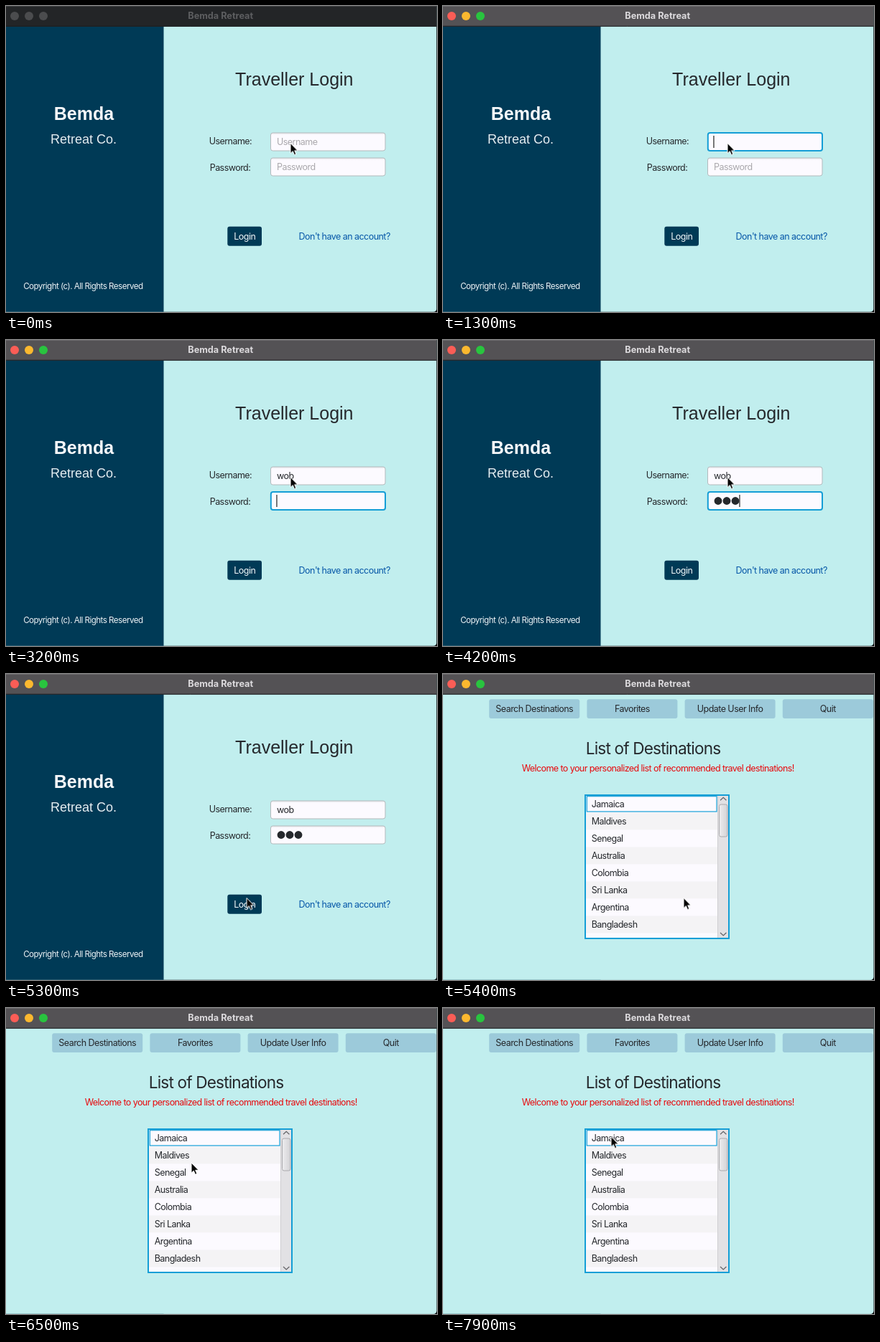
Animation of 600x427 px, one loop 8 s. Source, as an HTML page:

```html
<!DOCTYPE html>
<html lang="en">
<head>
<meta charset="utf-8">
<title>Traveller Login</title>
<style>
html, body { margin: 0; width: 100%; height: 100%; overflow: hidden; background: #0c0d0f; }
svg { display: block; width: 100vw; height: 100vh; }
text { font: 12.5px Inter, Roboto, sans-serif; letter-spacing: -.54px; fill: #25282c; }
.mid { text-anchor: middle; }
.title { font-weight: 700; font-size: 12.7px; letter-spacing: 0; fill: #dcdadd; }
.dim { fill: #5d5e60; }
.arial { font-family: "Liberation Sans", Arial, sans-serif; font-size: 25px; letter-spacing: 0; }
.brand { font-weight: 700; fill: #f6f8fa; }
.sub { font-size: 18px; fill: #e6edf1; }
.legal { font-size: 11.6px; letter-spacing: -.53px; fill: #eef3f6; }
.head { font-size: 22.6px; letter-spacing: -.83px; }
.welcome { letter-spacing: -.58px; fill: #e8090d; }
.hint { fill: #aaa8ac; }
.link { fill: #0657a8; }
.light { fill: #f4f7f9; }
.field { fill: url(#fieldFill); stroke: #b3b9bc; }
.ring { fill: #fcfaff; stroke: #149ed6; stroke-width: 2; }
.caret { fill: #333; }

/* Every timeline is one 8 s loop */
.idle, .hint, .ring, .carets, .key, .list, .cursor, .walk { animation: 8s step-end infinite; }
.idle, .hintUser { animation-name: untilClick; }
.hintPass { animation-name: untilTab; }
.onUser { animation-name: userFocus; }
.onPass { animation-name: passFocus; }
.walkUser { animation-name: walkUser; }
.walkPass { animation-name: walkPass; }
.list { animation-name: listIn; }
.cursor { animation-name: move; animation-timing-function: ease-in-out; }
.caret { animation: blink 1s step-end infinite; }
.u1 { animation-name: u1; } .u2 { animation-name: u2; } .u3 { animation-name: u3; }
.p1 { animation-name: p1; } .p2 { animation-name: p2; } .p3 { animation-name: p3; }

@keyframes untilClick { 0% { opacity: 1; } 7.5%, 100% { opacity: 0; } }
@keyframes untilTab { 0% { opacity: 1; } 37.5%, 100% { opacity: 0; } }
@keyframes userFocus { 0% { opacity: 0; } 7.5% { opacity: 1; } 37.5%, 100% { opacity: 0; } }
@keyframes passFocus { 0% { opacity: 0; } 37.5% { opacity: 1; } 65%, 100% { opacity: 0; } }
@keyframes listIn { 0% { opacity: 0; } 67.5%, 100% { opacity: 1; } }
@keyframes blink { 0% { opacity: 0; } 20% { opacity: 1; } 70%, 100% { opacity: 0; } }
@keyframes u1 { 0% { fill-opacity: 0; } 25%, 100% { fill-opacity: 1; } }
@keyframes u2 { 0% { fill-opacity: 0; } 28.75%, 100% { fill-opacity: 1; } }
@keyframes u3 { 0% { fill-opacity: 0; } 31.25%, 100% { fill-opacity: 1; } }
@keyframes p1 { 0% { fill-opacity: 0; } 46.25%, 100% { fill-opacity: 1; } }
@keyframes p2 { 0% { fill-opacity: 0; } 50%, 100% { fill-opacity: 1; } }
@keyframes p3 { 0% { fill-opacity: 0; } 52.5%, 100% { fill-opacity: 1; } }
@keyframes walkUser {
  0% { transform: none; }
  25% { transform: translateX(9.5px); }
  28.75% { transform: translateX(16.6px); }
  31.25%, 100% { transform: translateX(23.7px); }
}
@keyframes walkPass {
  0% { transform: none; }
  46.25% { transform: translateX(12px); }
  50% { transform: translateX(24px); }
  52.5%, 100% { transform: translateX(36px); }
}
@keyframes move {
  0%, 57.5% { transform: translate(396px, 191.5px); }
  65%, 71.25% { transform: translate(335px, 312.5px); }
  81.25% { transform: translate(258px, 216px); }
  91.25%, 100% { transform: translate(234px, 179.5px); }
}
</style>
</head>
<body>
<svg viewBox="0 0 600 427" preserveAspectRatio="none">
  <defs>
    <linearGradient id="fieldFill" x2="0" y2="1">
      <stop offset="0" stop-color="#e6e6ea"/>
      <stop offset=".12" stop-color="#fcfaff"/>
    </linearGradient>
    <linearGradient id="thumb">
      <stop offset="0" stop-color="#ededef"/>
      <stop offset="1" stop-color="#d3d2d5"/>
    </linearGradient>
    <clipPath id="window"><path d="M0 0H599.3V423Q599 426.5 595 426.7H0Z"/></clipPath>
  </defs>

  <g clip-path="url(#window)">
    <rect width="600" height="427" fill="#c1eeee"/>

    <g id="login">
      <rect y="28" width="219.5" height="399" fill="#003a56"/>
      <text class="mid arial brand" x="108.5" y="159">Bemda</text>
      <text class="mid arial sub" x="108" y="192">Retreat Co.</text>
      <text class="mid legal" x="107.3" y="395">Copyright (c). All Rights Reserved</text>
      <text class="mid arial" x="401.3" y="111">Traveller Login</text>

      <text x="282.7" y="193">Username:</text>
      <text x="283.7" y="229.5">Password:</text>
      <rect class="field" x="368.5" y="177" width="159.5" height="25" rx="3"/>
      <rect class="field" x="368.5" y="212" width="159.5" height="25" rx="3"/>
      <rect class="ring onUser" x="368.8" y="177" width="159.2" height="25" rx="3"/>
      <rect class="ring onPass" x="368.8" y="212" width="159.2" height="25" rx="3"/>
      <text class="hint hintUser" x="377" y="194">Username</text>
      <text class="hint hintPass" x="377" y="229">Password</text>

      <text x="377" y="194"><tspan class="key u1">w</tspan><tspan class="key u2">o</tspan><tspan class="key u3">b</tspan></text>
      <g fill="#25282c">
        <circle class="key p1" cx="383" cy="224.5" r="5.4"/>
        <circle class="key p2" cx="395" cy="224.5" r="5.4"/>
        <circle class="key p3" cx="407" cy="224.5" r="5.4"/>
      </g>
      <g class="carets onUser"><g class="walk walkUser"><rect class="caret" x="376.3" y="181" width="1.3" height="17"/></g></g>
      <g class="carets onPass"><g class="walk walkPass"><rect class="caret" x="376.3" y="216" width="1.3" height="17"/></g></g>

      <rect x="308.3" y="307.7" width="47.7" height="27" rx="3" fill="#003a56"/>
      <text class="mid light" x="332.3" y="325.5">Login</text>
      <text class="mid link" x="471.2" y="326">Don't have an account?</text>
    </g>

    <g class="list">
      <rect y="28" width="600" height="399" fill="#c1eeee"/>
      <g id="nav"></g>
      <text class="mid head" x="292.5" y="112">List of Destinations</text>
      <text class="mid welcome" x="299.3" y="136">Welcome to your personalized list of recommended travel destinations!</text>
      <rect x="198" y="169" width="200" height="200" fill="#fcfaff"/>
      <g id="rows"></g>
      <rect x="200.3" y="170.7" width="180.7" height="21.3" fill="none" stroke="#149ed6" stroke-width="1.2"/>
      <rect x="382.5" y="169" width="15" height="200" fill="#e2e1e4"/>
      <path d="M382.5 169V369" stroke="#cfced1"/>
      <rect x="384.5" y="182" width="11.5" height="45" rx="2.5" fill="url(#thumb)" stroke="#aaa9ad"/>
      <path d="M386 176.3L390.2 172.3L394.4 176.3M386 361L390.2 365L394.4 361" fill="none" stroke="#636266" stroke-width="1.2"/>
      <rect x="198" y="169" width="200" height="200" fill="none" stroke="#149ed6" stroke-width="2"/>
    </g>

    <g id="bar">
      <rect width="600" height="28.5" fill="#545255"/>
      <path d="M0 .5H600" stroke="#6b696c"/>
      <circle cx="12" cy="14" r="6" fill="#fb5d56"/>
      <circle cx="32" cy="14" r="6" fill="#fbb82f"/>
      <circle cx="52" cy="14" r="6" fill="#29c43f"/>
      <text class="mid title" x="298.7" y="18">Bemda Retreat</text>
      <g class="idle">
        <rect width="600" height="28.5" fill="#232527"/>
        <path d="M0 .5H600" stroke="#3d3f41"/>
        <g fill="#4b4c4e">
          <circle cx="12" cy="14" r="6"/><circle cx="32" cy="14" r="6"/><circle cx="52" cy="14" r="6"/>
        </g>
        <text class="mid title dim" x="298.7" y="18">Bemda Retreat</text>
      </g>
      <path d="M0 28.2H600" stroke="#1b1c1e"/>
    </g>
  </g>

  <g class="cursor">
    <path d="M0 0V14.2L3.3 11.2L5.5 16.3L7.9 15.3L5.7 10.3H10Z" fill="#050505" stroke="#fff" stroke-width="1" stroke-linejoin="round"/>
  </g>
</svg>
<script>
const add = (id, markup) => { document.getElementById(id).innerHTML += markup; };

['Search Destinations', 'Favorites', 'Update User Info', 'Quit'].forEach((label, i) => {
  const x = 64.2 + i * 136.2;
  add('nav', `<rect x="${x}" y="35.2" width="126" height="26.8" rx="3" fill="#9ccada"/>
    <text class="mid" x="${x + 63}" y="52.7">${label}</text>`);
});

['Jamaica', 'Maldives', 'Senegal', 'Australia', 'Colombia', 'Sri Lanka', 'Argentina', 'Bangladesh'].forEach((place, i) => {
  const y = 169.5 + i * 24;
  add('rows', `<rect x="199" y="${y}" width="183" height="24" fill="${i % 2 ? '#f4f3f5' : '#fcfaff'}"/>
    <text x="206.7" y="${y + 16.5}">${place}</text>`);
});
</script>
</body>
</html>
```
